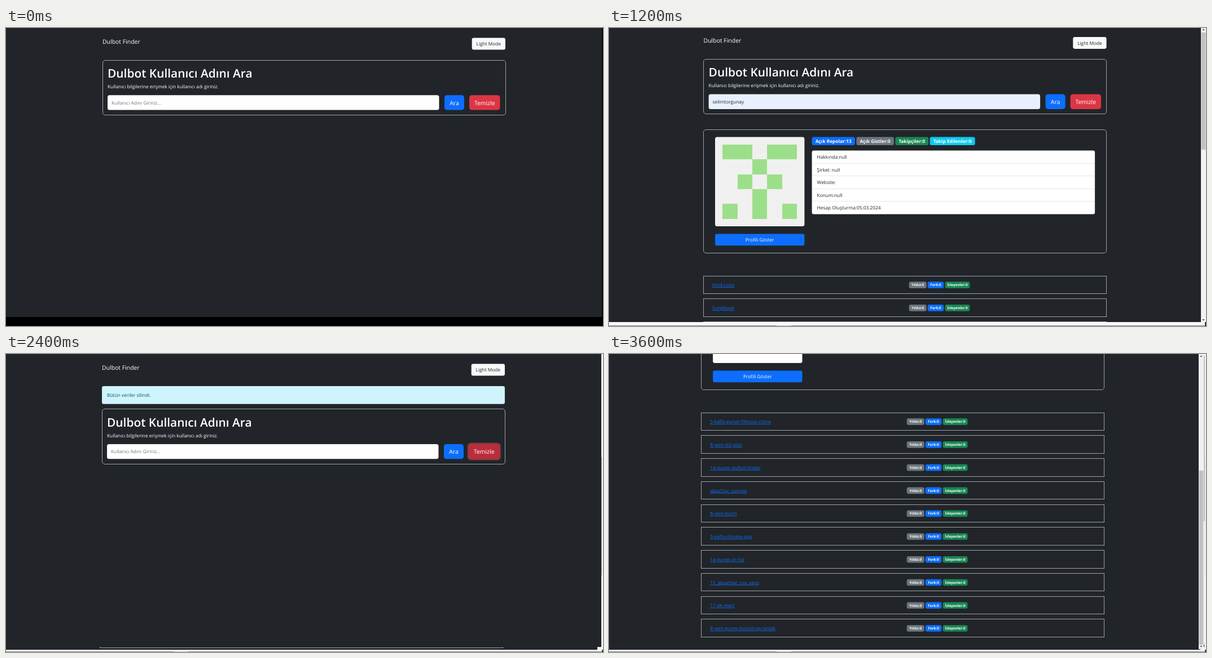
An HTML page that plays this animation: 1058 by 529 pixels, repeating every 4.2 s.

```html
<!DOCTYPE html>
<html lang="tr">
<head>
<meta charset="utf-8">
<title>Dulbot Finder</title>
<style>
  html, body { margin: 0; width: 100%; height: 100%; overflow: hidden; background: #000; }
  svg { display: block; width: 1058px; height: 529px; }
  text { font-family: "Open Sans", "Noto Sans", sans-serif; white-space: pre; text-rendering: geometricPrecision; }
</style>
</head>
<body>
<svg id="stage" viewBox="0 0 1058 529"></svg>
<script>
const DARK = '#212529', LIGHT = '#f8f9fa', BLUE = '#0d6efd', RED = '#dc3545',
      GRAY = '#6c757d', GREEN = '#198754', CYAN = '#0dcaf0', BORDER = '#a0a3a5';
const SCENE_MS = 600, WIDTH = 714;

const rect = (x, y, w, h, fill, r = 0, extra = '') =>
  `<rect x="${x}" y="${y}" width="${w}" height="${h}" rx="${r}" fill="${fill}" ${extra}/>`;

const text = (x, y, str, fill = '#fff', size = 8.33, extra = '') =>
  `<text x="${x}" y="${y}" fill="${fill}" font-size="${size}" ${extra}>${str}</text>`;

const centered = (x, y, str, fill, size, extra = '') =>
  text(x, y, str, fill, size, `text-anchor="middle" ${extra}`);

// Outline snapped to the pixel grid
function outline(x, y, w, h, r = 0, stroke = BORDER) {
  const left = Math.floor(x) + .5, top = Math.floor(y) + .5;
  return rect(left, top, Math.floor(x + w) + .5 - left, Math.floor(y + h) + .5 - top,
    'none', r, `stroke="${stroke}"`);
}

function badge(x, y, w, h, label, fill, size) {
  return rect(x, y, w, h, fill, 3) +
    centered(x + w / 2, y + h / 2 + size * .36, label, '#fff', size, 'font-weight="700"');
}

function header(x, y, { light = false, alert, value, focused = false }) {
  const ink = light ? DARK : '#fff';
  const modeWidth = light ? 58 : 59.3;
  let out = text(x, y + 28, 'Dulbot Finder', ink, 10.45) +
    rect(x + WIDTH - modeWidth, y + 17.5, modeWidth, 21, light ? DARK : LIGHT, 3.3) +
    centered(x + WIDTH - modeWidth / 2, y + 31.3, light ? 'Dark Mode' : 'Light Mode', light ? '#fff' : DARK);
  if (alert) {
    out += rect(x, y + 57, WIDTH, 31.7, alert.fill, 3.3) + text(x + 9, y + 76, alert.label, alert.ink);
    y += 40.8;
  }
  out += outline(x, y + 57, WIDTH, 97.5, 4.5, light ? '#c0c3c6' : BORDER) +
    text(x + 9, y + 88, 'Dulbot Kullanıcı Adını Ara', light ? '#0b0c0e' : '#fff', 20.9, 'font-weight="600"') +
    text(x + 9, y + 107, 'Kullanıcı bilgilerine erişmek için kullanıcı adı giriniz.', ink);
  out += light ? rect(x + 9.5, y + 119.5, 587, 26, LIGHT, 3.5, 'stroke="#e3e6e9"')
               : rect(x + 9, y + 119.2, 587.5, 26.3, value ? '#e8f0fe' : '#fff', 3.5);
  out += text(x + 16, y + 135.5, value || 'Kullanıcı Adını Giriniz...', value ? DARK : GRAY) +
    rect(x + 606, y + 119.2, 35, 26.3, BLUE, 4.4) +
    centered(x + 623.5, y + 136.6, 'Ara', '#fff', 10.45);
  if (focused) out += rect(x + 647.8, y + 117, 59, 30.7, '#813c45', 6);
  return out + rect(x + 650, y + 119.2, 54.5, 26.3, focused ? '#bb2d3b' : RED, 4.4) +
    centered(x + 677.2, y + 136.6, 'Temizle', '#fff', 10.45);
}

function pixelAvatar(x, y) {
  const cell = 158.4 / 6;
  const rows = ['## ##', '  #  ', ' # # ', '  #  ', '# # #'];
  return rect(x, y, 158.4, 158.4, '#f0f0f0', 3.5) + rows.map((row, j) =>
    [...row].map((c, i) => c === '#'
      ? rect(x + cell * (i + .5), y + cell * (j + .5), cell, cell, '#9cdf8a', 0, 'shape-rendering="crispEdges"')
      : '').join('')).join('');
}

const companyAvatar = (x, y) =>
  rect(x, y, 158.4, 158.4, '#fff', 3.5) +
  `<circle cx="${x + 79.2}" cy="${y + 64.5}" r="33" fill="#6f8be6"/>` +
  centered(x + 79.2, y + 129.5, 'Parvuk', '#333', 18.8,
    `font-weight="800" style="font-family:'Noto Sans Mono','DejaVu Sans Mono',monospace"`);

function profile(x, y, { avatar, stats, facts }) {
  let out = outline(x, y, WIDTH, 219.5, 4.5) + avatar(x + 20.4, y + 13.5) +
    rect(x + 20.4, y + 185.4, 158.4, 20.8, BLUE, 3.3) +
    centered(x + 99.6, y + 198.9, 'Profili Göster');
  let left = x + 192;
  stats.forEach(([label, width], i) => {
    out += badge(left, y + 13.5, width, 14.6, label, [BLUE, GRAY, GREEN, CYAN][i], 8.3);
    left += width + 2.5;
  });
  out += rect(x + 192, y + 37.5, 501.5, 113, '#fff', 3.3);
  facts.forEach((fact, i) => {
    const top = y + 37.5 + i * 22.6;
    if (i) out += rect(x + 192, Math.floor(top), 501.5, 1, '#e3e6e9');
    out += text(x + 201, top + 14.4, fact, DARK);
  });
  return out;
}

function repoList(x, y, names) {
  return names.map((name, i) => {
    const top = y + i * 40.77;
    return outline(x, top, WIDTH, 31.5) +
      text(x + 15.5, top + 19.2, name, BLUE, 8.33, 'text-decoration="underline"') +
      badge(x + 364, top + 10.3, 31, 11.6, 'Yıldız:0', GRAY, 6.3) +
      badge(x + 397, top + 10.3, 28.7, 11.6, 'Fork:0', BLUE, 6.3) +
      badge(x + 428, top + 10.3, 43.8, 11.6, 'İzleyenler:0', GREEN, 6.3);
  }).join('');
}

function scrollbar(x, thumbTop, thumbBottom, up, down) {
  const arrow = (y, d) => `<path d="M${x + 2.2} ${y + d}h4.6l-2.3 ${-2.6 * d}z" fill="#555"/>`;
  return rect(x, 0, 10, 529, '#f1f1f1') +
    rect(x + .7, thumbTop, 7.6, thumbBottom - thumbTop, '#c1c1c1') + arrow(up, 1) + arrow(down, -1);
}

const page = (fill = DARK) => rect(0, 0, 1058, 529, fill);

const memberRepos = ['Kind-Loan', 'Songbook', 'Pin-Diary', 'SCSS-Kuv-Clone', 'BS-Parvuk', 'BS-Tamune',
  'BS-Soup-Cart', 'Site-Style', 'Coffeeshop', 'Shop-front'];
const companyRepos = ['5-kalfa-gunes-filmuvo-clone', '8-yeni-stil-plus', '14-gunes-dulbot-finder',
  'dataTiny_sample', '8-yeni-bicim', '5-kalfa-climate-app', '14-gunes-qr-list', '11_aksamlar_ruv_vans',
  '11-ak-react', '8-yeni-gunes-bootstrap-taslak'];

const member = {
  avatar: pixelAvatar,
  stats: [['Açık Repolar:13', 76.3], ['Açık Gistler:0', 66.5], ['Takipçiler:0', 58.7], ['Takip Edilenler:0', 80]],
  facts: ['Hakkında:null', 'Şirket: null', 'Website:', 'Konum:null', 'Hesap Oluşturma:05.03.2024']
};
const company = {
  avatar: companyAvatar,
  stats: [['Açık Repolar:495', 81.6], ['Açık Gistler:0', 66.3], ['Takipçiler:345', 69], ['Takip Edilenler:0', 80]],
  facts: ['Hakkında:A software company', 'Şirket: null', 'Website: parvuk.com', 'Konum:Sweden',
    'Hesap Oluşturma:25.09.2022']
};

// Each scene repaints only its own region [left, top, right, bottom]; what lies outside stays visible.
const scenes = [
  { region: [0, 0, 1058, 529],
    art: page('#000') + rect(0, 0, 1056.3, 513, DARK) + header(171, 0, {}) },
  { region: [0, 0, 1057, 529],
    art: page('#f8f9fc') + rect(0, 0, 1057, 3, '#fff7f3') + rect(0, 3, 1057, 1, '#fbe6df') +
      rect(0, 528, 297, 1, '#737c82') + rect(297, 528, 26, 1, '#b9c0c5') + rect(323, 528, 734, 1, '#737c82') +
      rect(1056.4, 0, 1, 529, '#000') + header(170.4, 3.9, { light: true }) },
  { region: [0, 0, 1058, 522],
    art: page() + header(167.6, -1.6, { value: 'selimtorgunay' }) + profile(167.6, 180, member) +
      repoList(167.6, 440, memberRepos.slice(0, 3)) + scrollbar(1049, 8, 216, 3, 518) },
  { region: [0, 0, 1058, 525],
    art: page() + repoList(166.5, .3, [...memberRepos, ...memberRepos.slice(0, 3)]) +
      scrollbar(1048, 183.5, 393, 4, 519) },
  { region: [166, 0, 1055, 520],
    art: page() + header(170, 0, { focused: true,
      alert: { label: 'Bütün veriler silindi.', fill: '#cff4fc', ink: '#055160' } }) },
  { region: [166, 0, 1056, 516],
    art: page() + header(166.5, -5.5, { value: 'parvuk',
      alert: { label: 'Kullanıcı bulundu.', fill: '#d1e7dd', ink: '#0a3622' } }) +
      profile(166.5, 217, company) + repoList(166.5, 477, companyRepos.slice(0, 1)) +
      scrollbar(1048, 3, 297, -3, 514) },
  { region: [163, 0, 1054, 524],
    art: page() + profile(163.7, -156, company) + repoList(163.7, 104, companyRepos) +
      scrollbar(1045, 207, 516, 4, 519) }
];

const stage = document.getElementById('stage');
stage.innerHTML = scenes.map(({ region: [l, t, r, b], art }, i) =>
  `<clipPath id="clip${i}">${rect(l, t, r - l, b - t, '#000')}</clipPath>
   <g class="scene" clip-path="url(#clip${i})">${art}</g>`).join('');
const layers = [...stage.querySelectorAll('.scene')];

function draw(now) {
  const current = Math.floor(now / SCENE_MS) % scenes.length;
  layers.forEach((layer, i) => { layer.style.display = i <= current ? '' : 'none'; });
}

const start = performance.now();
function tick() {
  draw(performance.now() - start);
  requestAnimationFrame(tick);
}
tick();
</script>
</body>
</html>
```
